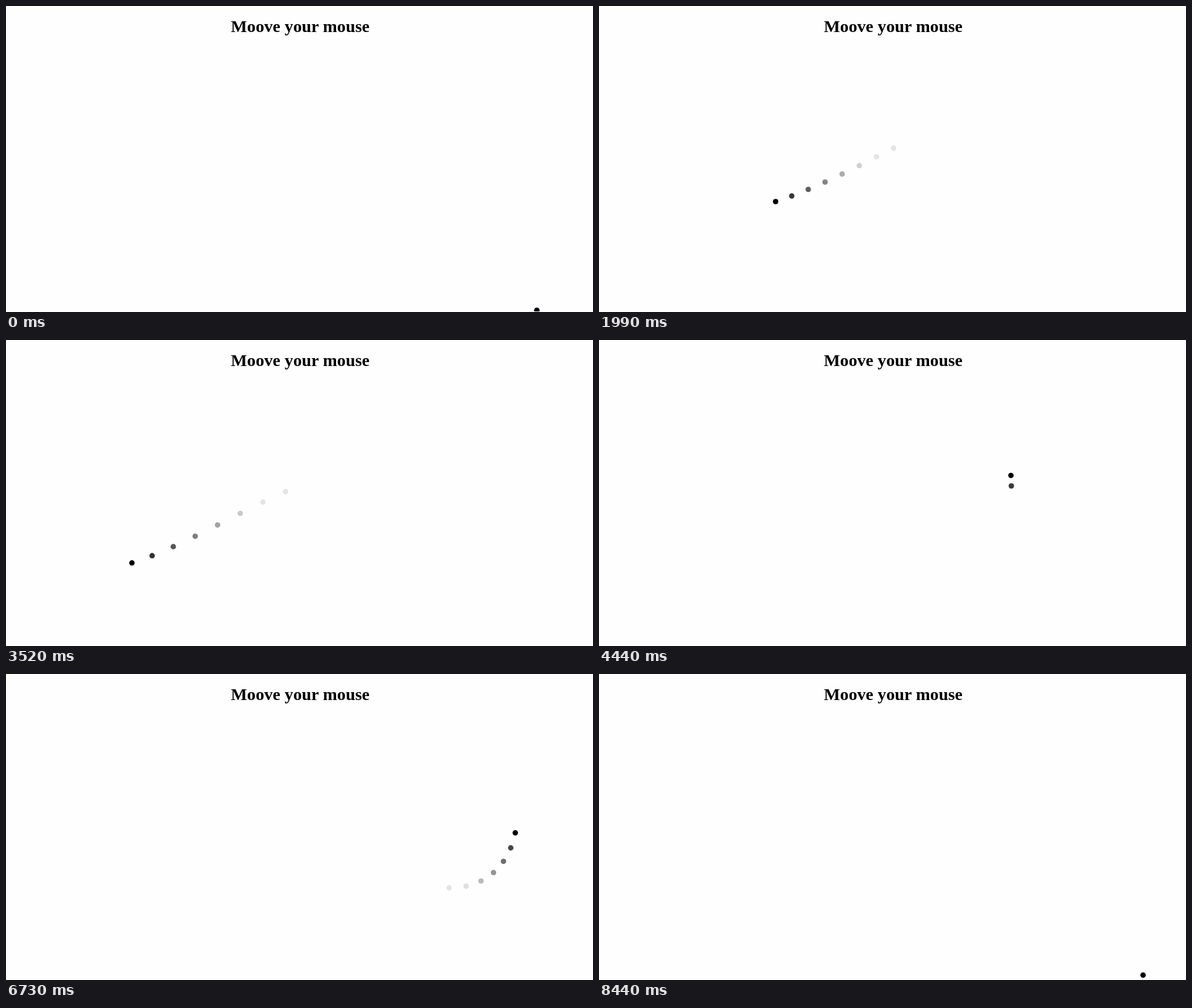
An HTML page with a canvas for the animation above (8850 ms loop, 1035x541 px).

```html
<!DOCTYPE html>
<html lang="en">
<head>
<meta charset="utf-8">
<title>Mouse trail</title>
<style>
  html, body { margin: 0; width: 100%; height: 100%; overflow: hidden; background: #fefefe; }
  canvas, svg { position: absolute; left: 0; top: 0; display: block; }
  text { font: bold 30.2px "Liberation Serif", "Times New Roman", Times, serif; fill: #000; }
</style>
</head>
<body>
<svg width="1035" height="541"><text x="396.6" y="46">Moove your mouse</text></svg>
<canvas id="stage" width="1035" height="540"></canvas>
<script>
const LOOP = 8850;
const SPACING = 1000 / 60;  // time between mouse events
const LIFE = 130;           // how long a dot stays, in ms
const FADE = 0.15;          // opacity lost per event
const RADIUS = 4.8;

// The pointer swings between these turning points in figures of eight.
// bulge is the height of the lobe there, as a share of the swing's width.
const turn = (t, x, y, bulge = 0) => ({ t, x, y, bulge });
const turns = [
  turn(0, 936, 538),
  turn(220, 936, 538),
  turn(1050, 324, 248, 0.07),
  turn(1540, 879, 320, 0.17),
  turn(2250, 57, 235, 0.135),
  turn(3170, 819, 340, 0.13),
  turn(3690, 23, 265, 0.17),
  turn(4240, 727, 258),
  turn(4418, 727, 258, 0.28),
  turn(5002, 323, 250, 0.05),
  turn(5672, 778, 300, 0.17),
  turn(6275, 126, 270, 0.17),
  turn(6735, 901, 250, 0.16),
  turn(7400, 168, 245, 0.2),
  turn(7950, 830, 340),
  turn(8305, 959.3, 532.3),
  turn(LOOP, 959.3, 532.3)
];

const mix = (a, b, k) => a + (b - a) * k;

function pointer(t) {
  const i = turns.findIndex(p => p.t > t);
  const a = turns[i - 1], b = turns[i];
  const u = (t - a.t) / (b.t - a.t);
  const ease = (1 - Math.cos(Math.PI * u)) / 2;
  const lift = Math.abs(b.x - a.x) * mix(a.bulge, b.bulge, ease);
  return {
    x: mix(a.x, b.x, ease),
    y: mix(a.y, b.y, ease) - lift * Math.sin(2 * Math.PI * u)
  };
}

const ctx = document.getElementById("stage").getContext("2d");

function dot({ x, y }, alpha) {
  ctx.globalAlpha = alpha;
  ctx.beginPath();
  ctx.arc(x, y, RADIUS, 0, Math.PI * 2);
  ctx.fill();
}

function draw(now) {
  ctx.clearRect(0, 0, 1035, 540);
  let newer = null;
  for (let n = Math.floor(now / SPACING); n >= 0 && now - n * SPACING < LIFE; n--) {
    const p = pointer(n * SPACING);
    const resting = newer && p.x === newer.x && p.y === newer.y;
    const events = (now - n * SPACING) / SPACING;
    // A pointer at rest sends no events, so its dot is drawn once.
    if (!resting) dot(p, newer ? Math.max(0.1, 1 - FADE * events) : 1);
    newer = p;
  }
}

const began = performance.now();

function tick() {
  draw((performance.now() - began) % LOOP);
  requestAnimationFrame(tick);
}
tick();
</script>
</body>
</html>
```
